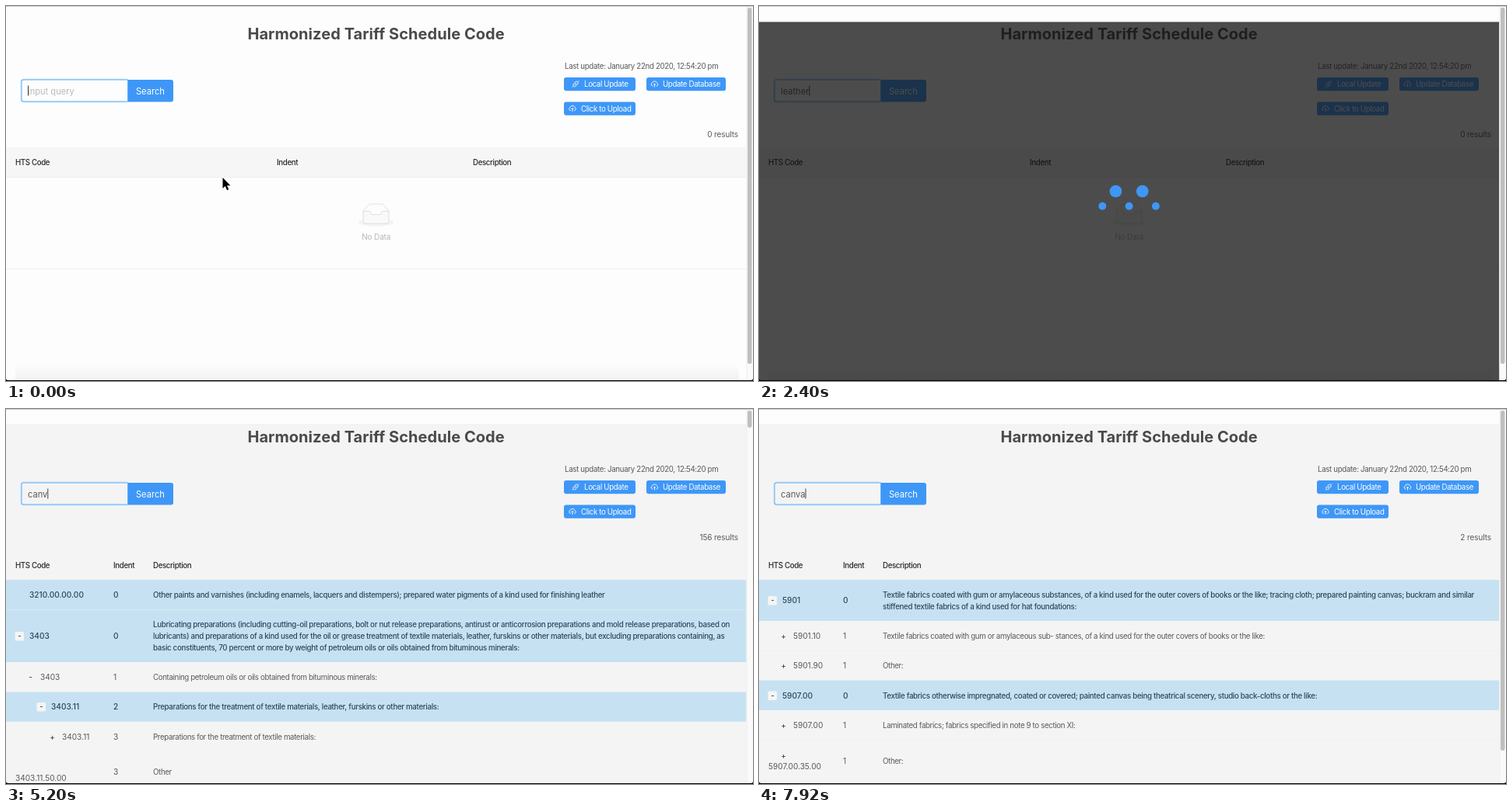
Recreate the animation shown at these times as an HTML page with a canvas. Size 960x483 px, loop 8 s.

```html
<!DOCTYPE html>
<html lang="en">
<head>
<meta charset="utf-8">
<title>Harmonized Tariff Schedule Code</title>
<style>
html, body { margin: 0; width: 100%; height: 100%; overflow: hidden; background: #fff; }
canvas { display: block; }
</style>
</head>
<body>
<canvas id="stage" width="960" height="483"></canvas>
<script>
const ctx = document.getElementById('stage').getContext('2d');
const LOOP = 8000, PAGE = 951.5;
const BLUE = '#3e97f7', ROW = '#c6e2f2', GREY = '#f4f4f4', WHITE = '#fdfdfd';
const INK = '#595959', DARK = '#262626', NAVY = '#30445c';
const SMALL = { size: 9.7, gap: -0.35 };

// Keystrokes: time and the resulting query
const keys = [[0, '']];
function type(word, times) { times.forEach((t, i) => keys.push([t, word.slice(0, i + 1)])); }
function erase(word, start, step) {
  for (let n = word.length - 1, t = start; n >= 0; n--, t += step) keys.push([t, word.slice(0, n)]);
}
type('leather', [700, 930, 980, 1030, 1190, 1430, 2040]);
erase('leather', 3700, 100);
type('canvas', [4700, 4870, 5030, 5180, 5400, 5960]);
keys.push([7890, 'canva']);

const loads = [[2300, 2540], [7097, 7340]];

const tables = {
  empty: { count: '0 results', cols: [348, 600] },
  leather: {
    count: '156 results', cols: [138, 189], thumb: 22,
    bands: [[220, 326], [364.5, 402.8]], lines: [258],
    rows: [
      [239, 30, '3210.00.00.00', '0', 'Other paints and varnishes (including enamels, lacquers and distempers); prepared water pigments of a kind used for finishing leather', 1],
      [292.5, 30, '3403', '0', 'Lubricating preparations (including cutting-oil preparations, bolt or nut release preparations, antirust or anticorrosion preparations and mold release preparations, based on|lubricants) and preparations of a kind used for the oil or grease treatment of textile materials, leather, furskins or other materials, but excluding preparations containing, as|basic constituents, 70 percent or more by weight of petroleum oils or oils obtained from bituminous minerals:', 1, '-'],
      [345.5, 44, '3403', '1', 'Containing petroleum oils or oils obtained from bituminous minerals:', 0, '-'],
      [383.5, 58, '3403.11', '2', 'Preparations for the treatment of textile materials, leather, furskins or other materials:', 1, '-'],
      [422, 72, '3403.11', '3', 'Preparations for the treatment of textile materials:', 0, '+'],
      [467.5, 12, '3403.11.50.00', '3', 'Other', 0, '', 475]
    ]
  },
  canvas: {
    count: '2 results', cols: [108, 159], thumb: 438,
    bands: [[220, 273], [349.5, 388]], lines: [311, 426],
    rows: [
      [246.5, 30, '5901', '0', 'Textile fabrics coated with gum or amylaceous substances, of a kind used for the outer covers of books or the like; tracing cloth; prepared painting canvas; buckram and similar|stiffened textile fabrics of a kind used for hat foundations:', 1, '-'],
      [292.5, 44, '5901.10', '1', 'Textile fabrics coated with gum or amylaceous sub- stances, of a kind used for the outer covers of books or the like:', 0, '+'],
      [330.5, 44, '5901.90', '1', 'Other:', 0, '+'],
      [369, 30, '5907.00', '0', 'Textile fabrics otherwise impregnated, coated or covered; painted canvas being theatrical scenery, studio back-cloths or the like:', 1, '-'],
      [407, 44, '5907.00', '1', 'Laminated fabrics; fabrics specified in note 9 to section XI:', 0, '+'],
      [453, 12, '5907.00.35.00', '1', 'Other:', 0, '', 460.5]
    ]
  }
};

function box(x, y, w, h, fill, r = 0) {
  ctx.fillStyle = fill;
  ctx.beginPath();
  ctx.roundRect(x, y, w, h, r);
  ctx.fill();
}

function dot(x, y, r, fill) {
  ctx.fillStyle = fill;
  ctx.beginPath();
  ctx.arc(x, y, r, 0, Math.PI * 2);
  ctx.fill();
}

// y is the middle of the capitals
function text(str, x, y, { size = 10, weight = 400, gap = 0, color = INK, align = 'left' } = {}) {
  ctx.font = `${weight} ${size}px Inter, sans-serif`;
  ctx.letterSpacing = gap + 'px';
  ctx.textAlign = align;
  ctx.fillStyle = color;
  ctx.fillText(str, x, y + size * 0.364);
  return ctx.measureText(str).width;
}

function outline(path, color, width = 1) {
  ctx.strokeStyle = color;
  ctx.lineWidth = width;
  ctx.stroke(new Path2D(path));
}

function cloud(x, y) {
  ctx.save();
  ctx.translate(x, y);
  outline('M-2.2 2.6H-2.8A2.2 2.2 0 0 1 -3 -1.5A3.2 3.2 0 0 1 3 -1.5A2.2 2.2 0 0 1 2.8 2.6H2.2M0 4V-.4M-1.4 1L0 -.5L1.4 1', '#fff', 0.9);
  ctx.restore();
}

function plug(x, y) {
  ctx.save();
  ctx.translate(x, y);
  outline('M-4.2 4.2L-2.8 2.8M4.2 -4.2L2.8 -2.8M-1.8 -.8L1 2L-.2 3A2 2 0 0 1 -3 .4ZM1.8 .8L-1 -2L.2 -3A2 2 0 0 1 3 -.4Z', '#fff', 0.9);
  ctx.restore();
}

function button(x, y, w, label, textX, icon, iconX) {
  box(x, y, w, 17.2, BLUE, 2.9);
  icon(iconX, y + 8.5);
  text(label, textX, y + 8.5, { ...SMALL, color: '#fff' });
}

function searchBox(query, caret, back) {
  box(18.5, 93.5, 139, 31, '#cfe6fb', 4);
  box(157, 95, 58, 28.5, BLUE, [0, 3, 3, 0]);
  box(19.5, 94.5, 137.5, 29, '#5fb0fa', [3, 0, 0, 3]);
  box(20.5, 95.5, 135.5, 27, back, [2, 0, 0, 2]);
  const look = { size: 11.1, color: query ? INK : '#b9b9b9' };
  const width = text(query || 'input query', 28, 109.5, look);
  if (caret) box(28 + (query ? width : 0), 102.5, 1, 13, '#444');
  text('Search', 167, 109.5, { size: 11.1, color: '#fff' });
}

function noData() {
  ctx.save();
  ctx.translate(452.6, 254.3);
  ctx.scale(0.717, 0.717);
  ctx.fillStyle = '#f3f3f3';
  ctx.beginPath();
  ctx.ellipse(32, 34, 32, 7, 0, 0, Math.PI * 2);
  ctx.fill();
  const tray = 'M9 14H20Q22.4 14 22.4 17Q22.4 20 24.6 20H39.4Q41.6 20 41.6 17Q41.6 14 44 14H55V32Q55 36 52 36H12Q9 36 9 32Z';
  outline('M9 14L19.1 2.3Q20 1 21.1 1H42.9Q44 1 44.9 2.3L55 14', '#d6d6d6');
  ctx.fillStyle = '#f9f9f9';
  ctx.fill(new Path2D(tray));
  outline(tray, '#d6d6d6');
  ctx.restore();
  text('No Data', 475.7, 297, { color: '#b8b8b8', align: 'center', gap: -0.15 });
  box(0, 338, PAGE, 1, '#efefef');
}

function drawRow([y, x, code, indent, desc, hit, sign, codeY = y], cols) {
  const color = hit ? NAVY : INK;
  const weight = hit ? 500 : 400;
  const gap = hit ? -0.3 : SMALL.gap;
  if (sign) {
    if (hit) box(x - 18.5, y - 5.5, 11.5, 11.5, '#f5f5f5', 1.5);
    text(sign, x - 12.5, y, { color: '#333', align: 'center' });
  }
  text(code, x, codeY, { size: 10.1, color, weight });
  text(indent, cols[0], y, { size: 10.1, color, weight });
  const lines = desc.split('|');
  lines.forEach((line, i) =>
    text(line, cols[1], y + (i - (lines.length - 1) / 2) * 15, { ...SMALL, gap, color, weight }));
}

function drawTable(name) {
  const { count, cols, bands = [], lines = [], rows = [] } = tables[name];
  text(count, 941, 165.5, { align: 'right', gap: -0.1 });
  if (name === 'empty') {
    box(0, 182, PAGE, 38, '#f6f6f6');
    box(0, 220, PAGE, 1, '#ededed');
    noData();
  }
  ['HTS Code', 'Indent', 'Description'].forEach((head, i) =>
    text(head, [12, ...cols][i], 201, { ...SMALL, weight: 500, color: DARK }));
  for (const [top, end] of bands) box(0, top, PAGE, end - top, ROW);
  for (const y of lines) box(0, y, PAGE, 1, 'rgba(235,238,240,.6)');
  for (const row of rows) drawRow(row, cols);
  if (name === 'canvas') {
    text('+', 31.5, 446, { color: '#333', align: 'center' });
  }
}

function ease(x) {
  const curve = (a, b, s) => 3 * a * s * (1 - s) ** 2 + 3 * b * s * s * (1 - s) + s ** 3;
  let lo = 0, hi = 1;
  for (let i = 0; i < 20; i++) {
    const mid = (lo + hi) / 2;
    if (curve(0.15, 0.9, mid) < x) lo = mid; else hi = mid;
  }
  return curve(0.46, 0.6, lo);
}

// Five dots rising and falling in two alternating groups
function loader(age) {
  const steps = [
    [[0, 0.4], [30, 1], [0, 1.1], [-30, 1], [0, 0.75]],
    [[0, 1.1], [-30, 1], [0, 0.4], [30, 1], [0, 1]]
  ];
  const phase = (age % 1000) / 250;
  const n = Math.floor(phase), p = ease(phase - n);
  box(0, 20.5, PAGE, 462, 'rgba(16,16,16,.74)');
  for (let i = 0; i < 5; i++) {
    const [from, to] = [steps[i % 2][n], steps[i % 2][n + 1]];
    const mix = k => from[k] + (to[k] - from[k]) * p;
    dot(475.6 + (i - 2) * 17.15, 248.2 + mix(0) * 0.714, 7.4 * mix(1), BLUE);
  }
}

function pointer(t) {
  if (t >= 700) return;
  const p = Math.min(1, Math.max(0, (t - 80) / 320));
  ctx.save();
  ctx.translate(278.5 + 9 * p, 221 - 17 * p);
  const arrow = 'M0 0V14L3.2 11L5.6 16.2L7.8 15.2L5.5 10.2H9.8Z';
  outline(arrow, '#fff', 1.6);
  ctx.fillStyle = '#000';
  ctx.fill(new Path2D(arrow));
  ctx.restore();
}

function frameEdges(thumb) {
  box(PAGE, 1, 960 - PAGE, 481, '#fafafa');
  box(PAGE, 1, 1, 481, '#ebebeb');
  box(953, 2, 5.5, thumb, '#bfbfbf', 2.7);
  box(0, 0, 960, 1, '#c9c9c9');
  ctx.fillStyle = '#000';
  ctx.fill(new Path2D('M0 479.5Q0 482 3 482H957Q960 482 960 479.5V483H0Z'));
}

function draw(t) {
  const [keyTime, query] = keys.filter(k => k[0] <= t).pop();
  const name = t < loads[0][1] ? 'empty' : t < loads[1][1] ? 'leather' : 'canvas';
  const back = name === 'empty' ? WHITE : GREY;

  box(0, 0, 960, 483, WHITE);
  if (name === 'empty') {
    const shade = ctx.createLinearGradient(0, 462, 0, 482);
    shade.addColorStop(0, WHITE);
    shade.addColorStop(1, '#f1f1f1');
    box(12, 462, 930, 20, shade);
  } else {
    box(0, 19, PAGE, 464, GREY);
  }

  text('Harmonized Tariff Schedule Code', 475.6, 36, { size: 20, weight: 700, gap: 0.06, color: '#4a4a4a', align: 'center' });
  text('Last update: January 22nd 2020, 12:54:20 pm', 718, 77.5, { ...SMALL, gap: -0.32 });
  button(717, 92, 92, 'Local Update', 743, plug, 732);
  button(823, 92, 102, 'Update Database', 844, cloud, 833.5);
  button(717, 123.5, 92, 'Click to Upload', 739, cloud, 728);
  searchBox(query, (t - keyTime) % 1000 < 500, back);
  drawTable(name);

  const load = loads.find(([a, b]) => t >= a && t < b);
  if (load) loader(t - load[0]);
  frameEdges(tables[name].thumb || 459);
  pointer(t);
}

const start = performance.now();
function tick() {
  draw((performance.now() - start) % LOOP);
  requestAnimationFrame(tick);
}
tick();
</script>
</body>
</html>
```
